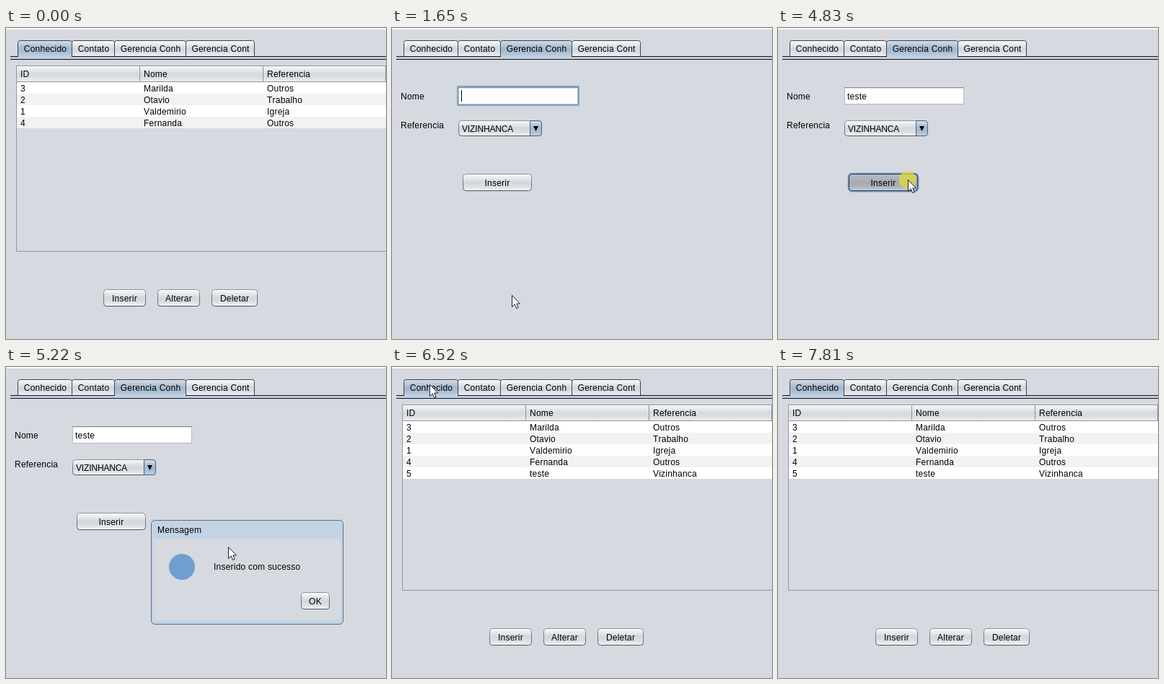
An HTML page for the animation above (8.31 s loop, 527 px wide and 431 px high).

```html
<!DOCTYPE html>
<html lang="pt">
<head>
<meta charset="utf-8">
<title>Cadastro</title>
<style>
html, body { margin: 0; width: 100%; height: 100%; overflow: hidden; background: #d6d9df; }
svg { display: block; }
text { font: 12px "Liberation Sans", Arial, sans-serif; font-kerning: none; letter-spacing: .22px; white-space: pre; }
</style>
</head>
<body>
<svg width="527" height="431" viewBox="0 0 527 431">
  <defs></defs>
  <g id="stage"></g>
</svg>
<script>
const LOOP = 8310, STEP = 40;

const gradients = {
  normal: ['#fbfbfc', '#e6e8ec', '#d3d6dc', '#dcdfe4', '#f3f4f7'],
  hover: ['#ffffff', '#f2f3f6', '#e2e5ea', '#eaecf0', '#fcfdff'],
  pressed: ['#b4b8c0', '#b0b4bd', '#a3a8b2', '#adb2bb', '#c9cdd4'],
  blue: ['#d5dfea', '#bac9d9', '#a3b8cf', '#abbfd5', '#c3d2e2'],
  header: ['#f7f8fa', '#e6e8ec', '#d6d9df', '#dcdfe4', '#eceef1'],
  edge: ['#8f9298', '#84878d', '#777a81', '#666a70', '#50545a']
};
document.querySelector('defs').innerHTML = Object.entries(gradients).map(([id, colors]) =>
  `<linearGradient id="${id}" x2="0" y2="1">` +
  colors.map((c, i) => `<stop offset="${i / 4}" stop-color="${c}"/>`).join('') +
  '</linearGradient>').join('');

const tabs = [['Conhecido', 16, 92], ['Contato', 91, 151], ['Gerencia Conh', 150, 250], ['Gerencia Cont', 249, 345]];
const people = [
  [3, 'Marilda', 'Outros'], [2, 'Otavio', 'Trabalho'], [1, 'Valdemirio', 'Igreja'],
  [4, 'Fernanda', 'Outros'], [5, 'teste', 'Vizinhanca']
];
const keyTimes = [2910, 3040, 3250, 3350, 3450];
const clicks = [[1520, 1650], [4750, 4960], [5780, 5860], [6320, 6450]];

// Pointer path: time, x, y
const path = [
  [370, 459, 431], [970, 166, 370],
  [1810, 166, 370], [2130, 165, 140], [2330, 152, 228],
  [4080, 152, 228], [4240, 190, 194],
  [4580, 190, 194], [4740, 180, 210],
  [4960, 180, 210], [5420, 420, 284], [5580, 446, 316],
  [5860, 446, 316], [6080, 70, 1], [6160, 52, 24],
  [6490, 52, 24], [6800, 110, 60], [7010, 144, 12], [7130, 150, 6],
  [7400, 440, 0], [7600, 514, 120], [7810, 490, 432]
];

const rect = (x, y, w, h, fill, more = '') =>
  `<rect x="${x}" y="${y}" width="${w}" height="${h}" fill="${fill}" ${more}/>`;
const text = (s, x, y, more = '') => `<text x="${x}" y="${y}" ${more}>${s}</text>`;
const centered = (s, x, y) => text(s, x, y, 'text-anchor="middle"');
const line = (x1, y1, x2, y2, color) =>
  `<path d="M${x1} ${y1}L${x2} ${y2}" stroke="${color}"/>`;

function pointerAt(t) {
  const i = path.findIndex(k => k[0] > t);
  if (i < 1) return [-50, -50];
  const [a, x, y] = path[i - 1], [b, x2, y2] = path[i];
  const u = Math.floor((t - a) / STEP) * STEP / (b - a);
  const e = u * u * (3 - 2 * u);
  return [Math.round(x + (x2 - x) * e), Math.round(y + (y2 - y) * e)];
}

const inside = ([px, py], x, y, w, h) => px >= x && px < x + w && py >= y && py < y + h;

function button(label, x, y, w, pointer, down) {
  const over = inside(pointer, x, y, w, 24), pressed = over && down;
  const look = pressed ? 'pressed' : over ? 'hover' : 'normal';
  return (pressed ? rect(x - .5, y - .5, w + 1, 25, 'none', 'rx="5" stroke="#73a4d1" stroke-width="2"') : '') +
    rect(x + .5, y + .5, w - 1, 23, `url(#${look})`, `rx="4" stroke="${pressed ? '#27344a' : 'url(#edge)'}"`) +
    centered(label, x + w / 2, y + 17);
}

function tabBar(selected) {
  const [, left, right] = tabs[selected];
  const shapes = tabs.map(([label, a, b], i) =>
    `<path d="M${a + .5} 40V20.5q0-3 3-3H${b - 3.5}q3 0 3 3V40" ` +
    `fill="url(#${i === selected ? 'blue' : 'normal'})" stroke="#3c414a"/>` + centered(label, (a + b) / 2 + .5, 33));
  return rect(6, 40, 521, 3, '#c3d0df') + shapes.join('') +
    line(6, 39.5, left + 1, 39.5, '#10131c') + line(right - 1, 39.5, 527, 39.5, '#10131c') +
    line(6, 43.5, 527, 43.5, '#10131c');
}

function listPage(count, pointer, down) {
  const columns = [20, 191, 362];
  let s = rect(14.5, 52.5, 520, 257, 'none', 'stroke="#9297a1"') +
    rect(15, 53, 512, 21, 'url(#header)') + line(15, 74.5, 527, 74.5, '#8c929c');
  for (const x of [185.5, 356.5, 526.5]) s += line(x, 53, x, 75, '#8c929c');
  ['ID', 'Nome', 'Referencia'].forEach((h, i) => s += text(h, columns[i], 68));
  people.slice(0, count).forEach((row, r) => {
    s += rect(15, 75 + 16 * r, 512, 16, r % 2 ? '#f2f2f2' : '#fff');
    row.forEach((cell, i) => s += text(cell, columns[i], 88 + 16 * r));
  });
  return s + button('Inserir', 135, 362, 59, pointer, down) +
    button('Alterar', 210, 362, 59, pointer, down) + button('Deletar', 285, 362, 64, pointer, down);
}

function formPage(t, pointer, down) {
  const typed = keyTimes.filter(k => k <= t).length;
  const focused = t < 4750;
  const blinkStart = typed ? keyTimes[typed - 1] : 1620;
  const caretOn = focused && Math.floor((t - blinkStart) / 500) % 2 === 0;
  const caretX = 96.5 + [0, 4, 11, 17, 20, 27][typed];
  const comboLook = inside(pointer, 92, 128, 116, 22) ? 'hover' : 'normal';
  return text('Nome', 12, 99) + text('Referencia', 12, 139) +
    (focused ? rect(91, 81, 168, 26, 'none', 'rx="1" stroke="#73a4d1" stroke-width="2"') : '') +
    rect(92.5, 82.5, 165, 23, '#fff', 'stroke="#b5b8be"') +
    line(92, 82.5, 258, 82.5, '#8d8e91') + line(93, 83.5, 257, 83.5, '#dcdde0') +
    text('teste'.slice(0, typed), 96, 99) +
    (caretOn ? line(caretX, 86, caretX, 102, '#000') : '') +
    rect(92.5, 128.5, 115, 21, `url(#${comboLook})`, 'rx="4" stroke="url(#edge)"') +
    '<path d="M191.5 128.5H204q3.5 0 3.5 4V146q0 3.5-3.5 3.5H191.5Z" fill="url(#blue)" stroke="#4f617a"/>' +
    '<path d="M196 136h7l-3.5 7z"/>' +
    text('VIZINHANCA', 97, 144, 'style="letter-spacing:-.15px"') +
    button('Inserir', 98, 202, 96, pointer, down);
}

function dialog(pointer, down) {
  return rect(201.5, 212.5, 266, 144, '#c3d3e6', 'rx="5" stroke="#5d6b7d"') +
    rect(205, 238, 259, 113, '#d6d9df') + text('Mensagem', 210, 230) +
    '<circle cx="244" cy="277" r="18" fill="#6f9fd0"/>' + text('Inserido com sucesso', 288, 281) +
    button('OK', 409, 312, 40, pointer, down);
}

function draw(t) {
  const pointer = pointerAt(t), [x, y] = pointer;
  const down = clicks.some(([a, b]) => t >= a && t < b);
  const onForm = t >= 1650 && t < 6450;
  return rect(0, 0, 527, 431, '#d6d9df') + rect(0, 0, 527, 2, '#fff') + tabBar(onForm ? 2 : 0) +
    (onForm ? formPage(t, pointer, down) : listPage(t < 1650 ? 4 : 5, pointer, down)) +
    (t >= 4960 && t < 5860 ? dialog(pointer, down) : '') +
    (down ? `<circle cx="${x - .5}" cy="${y + .5}" r="12" fill="#e0d93c" fill-opacity=".75"/>` : '') +
    `<path transform="translate(${x} ${y})" d="M.5 .5V16.5L4.2 12.9 6.7 18.5 9.2 17.5 6.8 12H11.5Z" fill="#fff" stroke="#1c1e2c"/>`;
}

const stage = document.getElementById('stage');
const start = performance.now();
let shown = '';
function tick() {
  const next = draw((performance.now() - start) % LOOP);
  if (next !== shown) stage.innerHTML = shown = next;
  requestAnimationFrame(tick);
}
tick();
</script>
</body>
</html>
```
